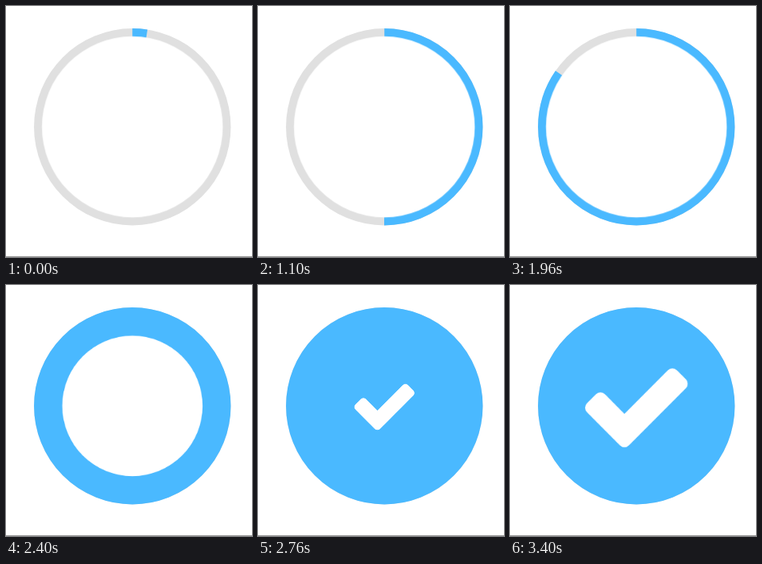
Write an HTML page that moves like this. It is 308 by 314 pixels and loops after 3.42 s.

```html
<!DOCTYPE html>
<html lang="en">
<head>
<meta charset="utf-8">
<title>Progress ring</title>
<style>
  html, body { margin: 0; width: 100%; height: 100%; overflow: hidden; background: #fff; }
  svg { display: block; width: 308px; height: 314px; }

  .pie, .hole, .check { animation: 3420ms linear infinite; }

  .pie {
    fill: none;
    stroke: #4ab9ff;
    stroke-width: 124;
    stroke-dasharray: 360.5 400;
    animation-name: sweep;
  }
  .hole { fill: #fff; animation-name: close; }
  .check { fill: #fff; animation-name: pop; }

  /* two half turns with a brief hold between them */
  @keyframes sweep {
    0% { stroke-dashoffset: 351.8; }
    31.579%, 32.164% { stroke-dashoffset: 180.5; }
    68.6%, 100% { stroke-dashoffset: 0; }
  }
  @keyframes close {
    0%, 68.567% { transform: scale(1); animation-timing-function: ease; }
    78.304%, 100% { transform: scale(0); }
  }
  @keyframes pop {
    0%, 78.216% { transform: scale(0); animation-timing-function: ease; }
    86.988% { transform: scale(1.2); animation-timing-function: ease; }
    95.76%, 100% { transform: scale(1); }
  }
</style>
</head>
<body>
<svg viewBox="0 0 308 314">
  <rect y="313" width="308" height="1" fill="#999"/>
  <g transform="translate(158.25 151.25)">
    <circle r="123.2" fill="#e0e0e0"/>
    <circle class="pie" r="61.2" pathLength="360" transform="rotate(-90)"/>
    <circle class="hole" r="113.2"/>
    <g class="check">
      <path transform="scale(.0829) translate(-896 -900)"
        d="M1671 566q0 40-28 68L783 1494q-28 28-68 28t-68-28L149 996q-28-28-28-68t28-68l136-136q28-28 68-28t68 28l294 295 656-657q28-28 68-28t68 28l136 136q28 28 28 68z"/>
    </g>
  </g>
</svg>
</body>
</html>
```
